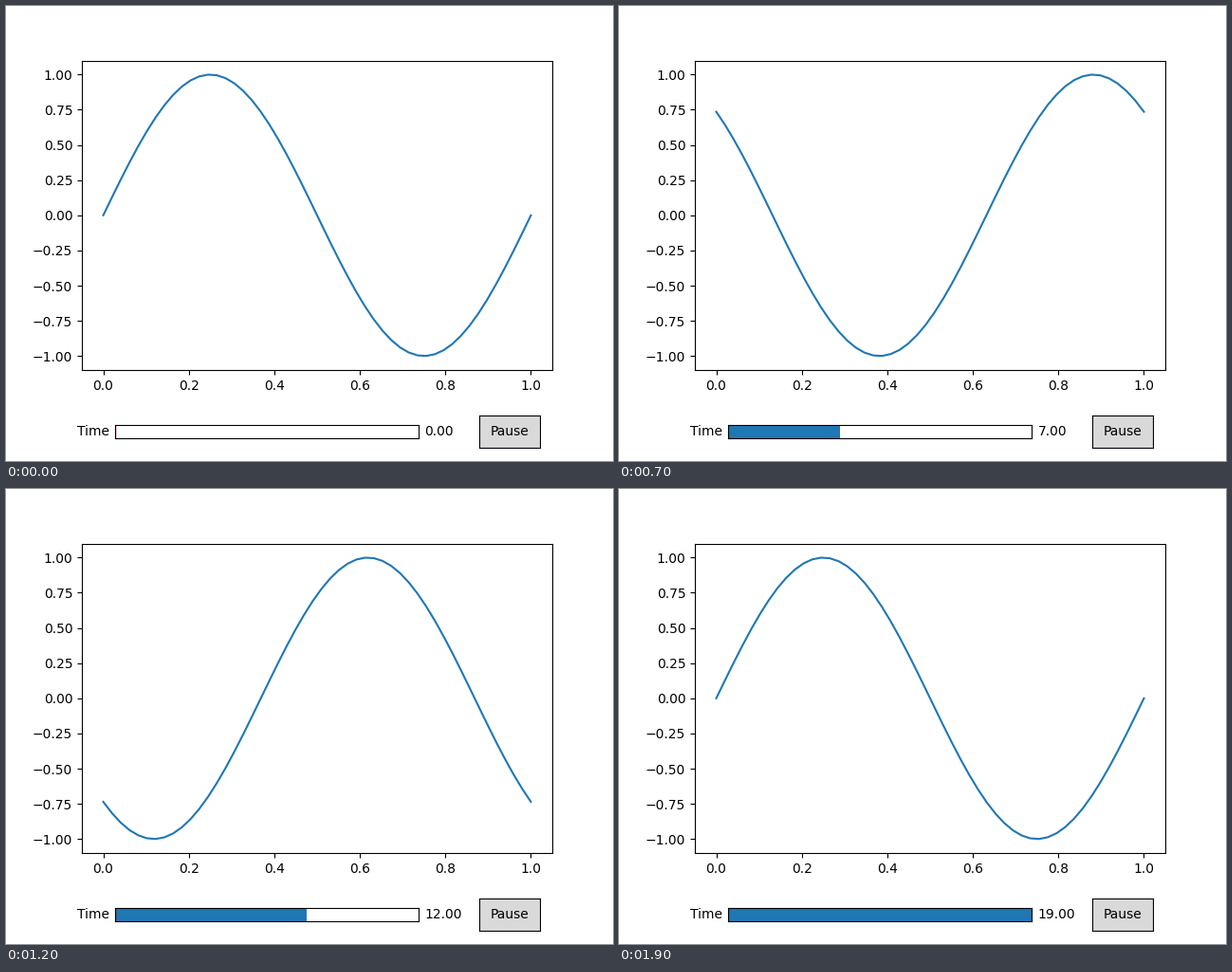
Recreate the animation shown at these times as a matplotlib script. Size 640 px wide and 480 px high, loop 2000 ms.

```python
import numpy as np
import matplotlib.pyplot as plt
from matplotlib.animation import FuncAnimation

FRAMES = 20
INTERVAL = 100
T_MAX = FRAMES - 1

plt.rcParams["font.family"] = "DejaVu Sans"
fig = plt.figure(figsize=(6.4, 4.8), dpi=100, facecolor="white")
x = np.linspace(0, 1, 50)


def wave(t):
    return np.sin(2 * np.pi * (x + t / T_MAX))


def widget_axes(rect, color):
    ax = fig.add_axes(rect, facecolor=color)
    ax.set(xticks=[], yticks=[], ylim=(0, 1))
    return ax


# Main plot; limits are fixed by the first curve
plot = fig.add_axes([0.125, 0.2, 0.775, 0.68])
curve, = plot.plot(x, wave(0), color="#1f77b4", lw=1.5)
plot.set_xlim(plot.get_xlim())
plot.set_ylim(plot.get_ylim())

# Time slider
slider = widget_axes([0.18, 0.05, 0.5, 0.03], "white")
slider.set_xlim(0, T_MAX)
bar = plt.Rectangle((0, 0), 0, 1, facecolor="#1f77b4", edgecolor="none")
slider.add_patch(bar)
slider.axvline(0, color="red", lw=1)
slider.text(-0.02, 0.5, "Time", transform=slider.transAxes,
            ha="right", va="center")
value = slider.text(1.02, 0.5, "0.00", transform=slider.transAxes,
                    ha="left", va="center")

# Pause button
button = widget_axes([0.78, 0.03, 0.1, 0.07], "0.85")
button.text(0.5, 0.5, "Pause", transform=button.transAxes,
            ha="center", va="center")


def update(t):
    curve.set_ydata(wave(t))
    bar.set_width(t)
    value.set_text(f"{t:.2f}")
    return curve, bar, value


anim = FuncAnimation(fig, update, frames=FRAMES, interval=INTERVAL,
                     init_func=lambda: update(0), repeat=True,
                     repeat_delay=0, blit=False)
plt.show()
```
